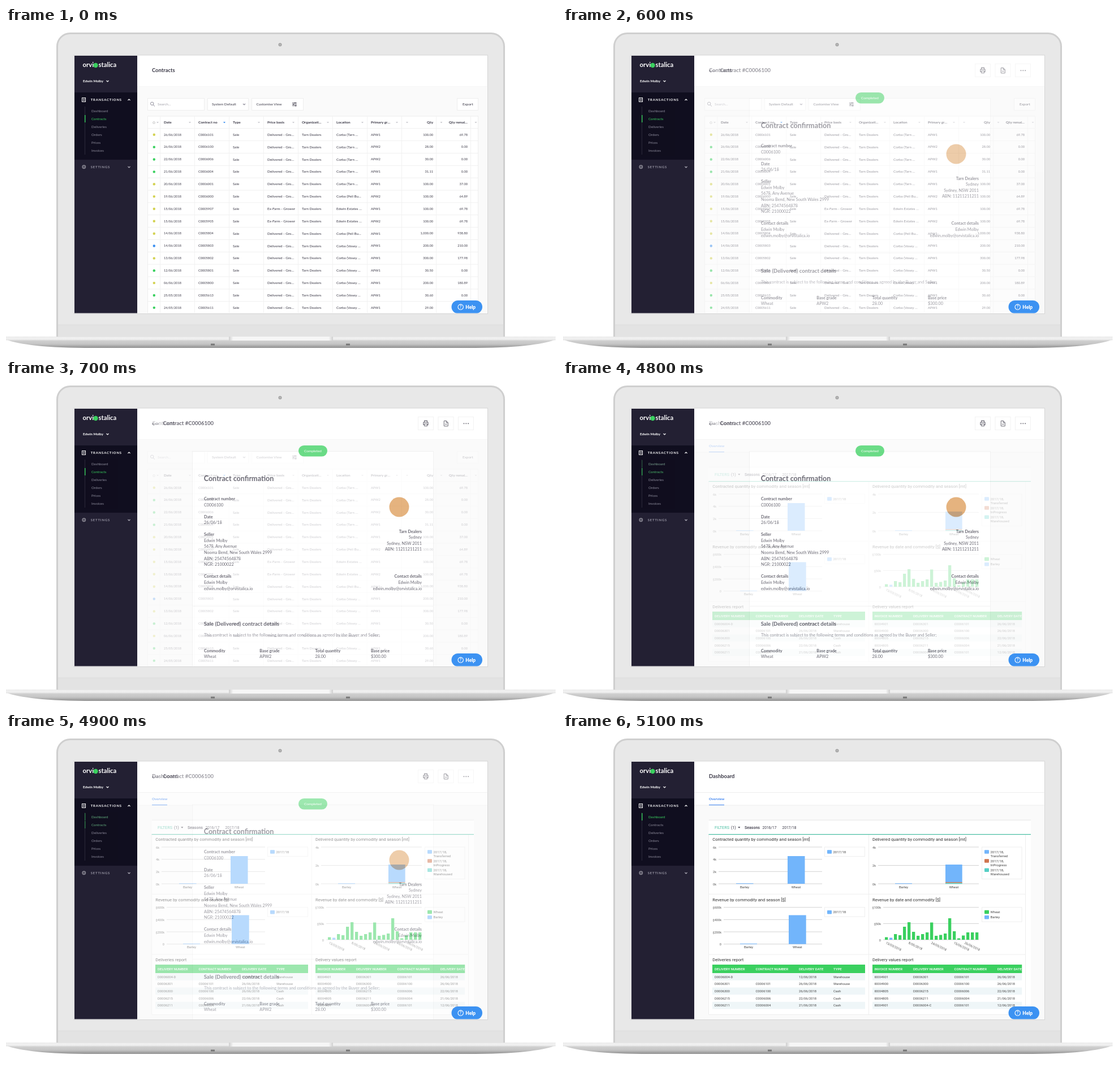
Write an HTML page that moves like this. It is 974x575 px and loops after 8000 ms.

```html
<!DOCTYPE html>
<html lang="en">
<head>
<meta charset="utf-8">
<title>Contracts</title>
<style>
html, body { margin: 0; width: 100%; height: 100%; overflow: hidden; background: #fff; }
svg { display: block; width: 100%; height: 100%; }
text { font-family: Lato, "Open Sans", sans-serif; white-space: pre; }
.din text { font-family: Roboto, Inter, sans-serif; }
</style>
</head>
<body>
<svg id="stage" viewBox="0 0 974 575">
  <defs>
    <clipPath id="screen"><rect x="121" y="49" width="729.5" height="455.5"/></clipPath>
    <clipPath id="report"><rect x="547" y="400" width="264.5" height="100"/></clipPath>
    <linearGradient id="deck" x2="0" y2="1">
      <stop offset="0" stop-color="#e4e4e4"/><stop offset=".35" stop-color="#f3f3f3"/><stop offset="1" stop-color="#e6e6e6"/>
    </linearGradient>
    <linearGradient id="under" x2="0" y2="1">
      <stop offset="0" stop-color="#d4d4d4"/><stop offset=".55" stop-color="#c4c4c4"/><stop offset="1" stop-color="#8f8f8f"/>
    </linearGradient>
    <linearGradient id="notch">
      <stop offset="0" stop-color="#cfcfcf"/><stop offset=".04" stop-color="#f6f6f6"/>
      <stop offset=".96" stop-color="#f6f6f6"/><stop offset="1" stop-color="#cfcfcf"/>
    </linearGradient>
  </defs>
</svg>
<script>
const INK = '#3b3947', GREEN = '#3ad05f', BLUE = '#72b5fb', LINE = '#eeeeee';
const attrs = o => Object.entries(o).map(([k, v]) => ` ${k}="${v}"`).join('');
const rect = (x, y, w, h, fill, o = {}) =>
  `<rect x="${x}" y="${y}" width="${w}" height="${h}" fill="${fill}"${attrs(o)}/>`;
const path = (d, stroke, width = 1, o = {}) =>
  `<path d="${d}" fill="none" stroke="${stroke}" stroke-width="${width}"${attrs(o)}/>`;
const shape = (d, fill) => `<path d="${d}" fill="${fill}"/>`;
const dot = (x, y, r, fill, o = {}) => `<circle cx="${x}" cy="${y}" r="${r}" fill="${fill}"${attrs(o)}/>`;
const hline = (x1, x2, y, c = LINE, w = 1) => path(`M${x1} ${y}H${x2}`, c, w);
const vline = (x, y1, y2, c = LINE, w = 1) => path(`M${x} ${y1}V${y2}`, c, w);
const box = (x, y, w, h, r = 0) => rect(x, y, w, h, '#fff', { stroke: LINE, rx: r });
const chevron = (x, y, c, up = 1) => path(`M${x - 2} ${y - up}l2 ${2 * up}l2 ${-2 * up}`, c, 1.1);
const caret = (x, y, c) => shape(`M${x - 2} ${y - 1}h4l-2 2.4z`, c);
// y is the middle of the capitals
const text = (x, y, s, size, fill = INK, o = {}) =>
  `<text x="${x}" y="${(y + size * .35).toFixed(2)}" font-size="${size}" fill="${fill}"${attrs(o)}>${s}</text>`;
const bold = (x, y, s, size, fill = INK, o = {}) => text(x, y, s, size, fill, { 'font-weight': 700, ...o });
const END = { 'text-anchor': 'end' }, MID = { 'text-anchor': 'middle' };

function laptop() {
  return rect(90.5, 9.5, 790, 560, '#e8e8e8', { rx: 23, stroke: '#cfcfcf', 'stroke-width': 3 }) +
    rect(92, 525, 787, 21, '#e3e3e3') + hline(92, 879, 525, '#dcdcdc') +
    rect(0, 546, 974, 29, '#fff') +
    dot(484.5, 29.5, 3, '#a3a3a3') + dot(484.5, 29.5, 1.2, '#c4c4c4') +
    rect(120, 48, 731.5, 457.5, '#fff', { stroke: '#d6d6d6' }) +
    shape('M0 551H971.5C955 558 915 565.5 830 566H140C58 565.5 16 558 0 551z', 'url(#under)') +
    rect(0, 546, 971.5, 6.5, 'url(#deck)') +
    rect(394, 546, 184, 7, 'url(#notch)') +
    rect(362, 558.5, 7, 3, '#777') + rect(601, 558.5, 7, 3, '#777');
}

function sidebar() {
  return rect(121, 49, 111, 456, '#232033') +
    bold(135.5, 65, 'orvi', 11.3, '#fff') + dot(158.5, 66, 4.2, GREEN) +
    bold(163.5, 65, 'stalica', 11.3, '#fff') +
    bold(136, 93.5, 'Edwin Molby', 6.2, '#fff') + chevron(179.5, 94, '#fff') +
    rect(121, 114, 111, 119, '#100e1f') +
    rect(134.5, 123.5, 6, 7, 'none', { stroke: '#fff' }) +
    path('M136 125.5h3.2M136 127h3.2M136 128.5h3.2', '#fff', .7) +
    bold(149.7, 127, 'TRANSACTIONS', 5.9, '#fff', { 'letter-spacing': .87 }) + chevron(217.5, 127, '#fff', -1) +
    dot(137.8, 245.8, 2.6, 'none', { stroke: '#85838f', 'stroke-width': 1.7 }) +
    dot(137.8, 245.8, .9, '#85838f') +
    bold(149.7, 245.8, 'SETTINGS', 5.9, '#9a98a6', { 'letter-spacing': .87 }) + chevron(217.5, 246, '#b5b3be');
}

function nav(active) {
  const names = ['Dashboard', 'Contracts', 'Deliveries', 'Orders', 'Prices', 'Invoices'];
  return rect(138, 138, 60, 88, '#100e1f') + vline(139.5, 139, 224, '#2b293a') +
    names.map((s, i) => text(151, 146.7 + i * 14, s, 6.2, i == active ? GREEN : '#8e8c9b')).join('') +
    vline(139.7, 140 + active * 14, 153 + active * 14, GREEN, 1.4);
}

const base = active => nav(active) + rect(232, 49, 619, 456, '#fafafa') + rect(232, 49, 619, 54, '#fff') +
  hline(232, 851, 103.5, '#f6f6f6');

function listPage() {
  const Y = '#d3d252', G = GREEN, B = '#3b8ff0';
  const places = ['Corba (Tarn …', 'Corba (Pell Bu…', 'Edwin Estates …', 'Corba (Vosey …'];
  // status, date, contract, grade, place, quantity, remaining
  const rows = `Y 26/06 6101 1 0 100.00 69.78
G 26/06 6100 2 0 28.00 0.00
G 22/06 6006 2 0 30.00 0.00
G 21/06 6004 1 0 31.11 0.00
Y 20/06 6001 1 0 100.00 37.00
Y 19/06 6000 2 1 100.00 64.89
Y 15/06 5907 1 2 100.00 69.78
Y 15/06 5905 2 2 100.00 69.78
Y 14/06 5804 1 1 1,000.00 938.80
B 14/06 5803 1 3 200.00 210.00
Y 13/06 5802 1 3 300.00 177.98
G 12/06 5801 1 3 30.50 0.00
Y 06/06 5800 1 3 200.00 180.89
G 25/05 5613 1 3 30.60 0.00
G 24/05 5611 1 3 29.00 0.00`.split('\n').map(r => r.split(' '));
  const heads = ['Date', 'Contract no', 'Type', 'Price basis', 'Organizati…', 'Location', 'Primary gr…'];
  let s = base(1) + bold(258, 75, 'Contracts', 9.4) +
    box(250.5, 124.5, 100, 21) + dot(258.2, 133.8, 2.7, 'none', { stroke: '#8d8b98' }) +
    path('M260.2 136l2.8 2.6', '#8d8b98') + text(268, 135, 'Search...', 6.4, '#a5a4ac') +
    box(356.5, 124.5, 72, 21) + text(364, 135, 'System Default', 6.4) + chevron(421, 135, '#8d8b98') +
    box(434.5, 124.5, 91, 21) + text(442.5, 135, 'Customise View', 6.4) +
    path('M506 132.5h8M506 135h8M506 137.5h8', INK, .8) +
    path('M511 131.4v2.2M508 133.9v2.2M512 136.4v2.2', INK, 1.5) +
    box(797.5, 124.5, 37, 21) + text(807, 135, 'Export', 6.4) +
    rect(250.5, 156, 584, 349, '#fff', { stroke: LINE });
  for (let i = 0; i < 10; i++) s += vline(272.5 + 61 * i, 156, 505, '#f2f2f2');
  s += dot(261.5, 167.5, 1.8, 'none', { stroke: '#aaa', 'stroke-width': .7 }) + caret(268, 167, '#c9c9cf');
  heads.forEach((h, i) => {
    s += bold(279 + 61 * i, 167, h, 6.4) +
      caret(325 + 61 * i, 167, i == 1 ? '#3b8ff0' : '#c9c9cf');
  });
  s += bold(755, 167, 'Qty', 6.4, INK, END) + bold(816, 167, 'Qty remai…', 6.4, INK, END) +
    [709, 769.5, 830.5].map(x => caret(x, 167, '#c9c9cf')).join('');
  rows.forEach(([c, date, no, grade, place, qty, left], i) => {
    const y = 188.6 + 21.86 * i;
    s += hline(251, 834, y - 10.9, '#f0f0f0') + dot(261.8, y + .2, 2.2, { Y, G, B }[c]) +
      text(279, y, date + '/2018', 5.6) + text(340, y, 'C000' + no, 5.65) + text(401, y, 'Sale', 6.3) +
      text(462, y, place == 2 ? 'Ex-Farm - Grower' : 'Delivered - Gro…', 6.3) +
      text(523, y, 'Tarn Dealers', 6.3) + text(584, y, places[place], 6.3) + text(645, y, 'APW' + grade, 5.8) +
      text(755, y, qty, 5.7, INK, END) + text(816, y, left, 5.7, INK, END);
  });
  return s;
}

function contractPage() {
  const lines = (x, y, list, o) => list.map((v, i) => (i ? text : bold)(x, y + 10.65 * i, v, 7.25, INK, o)).join('');
  let s = base(1) + path('M270 76H258.5m3.5 -3l-3.5 3l3.5 3', '#777581', .9) +
    bold(277.5, 75, 'Contract #C0006100', 9.5) +
    [728.5, 764, 799.5].map(x => box(x, 63.5, 27, 23)).join('') +
    path('M739.5 73v-2.6h5v2.6M739.5 77.5h-1.6v-4.3h8.2v4.3h-1.6', INK, 1.1) +
    rect(739.7, 76, 4.8, 3.6, 'none', { stroke: INK }) +
    path('M774.3 70.5h4l3 3v6.3h-7zM778.2 70.5v3.2h3', INK, 1) + path('M776 76.5h3.6', INK, .9) +
    [809.5, 813.3, 817.1].map(x => dot(x, 75.3, .95, INK)).join('') +
    rect(329.5, 124.5, 426, 390, '#fff', { stroke: LINE }) +
    rect(517, 114, 51, 19.5, GREEN, { rx: 9.75 }) + text(542.5, 124, 'Completed', 6.4, '#fff', MID) +
    bold(349.7, 173, 'Contract confirmation', 12.6) +
    lines(350, 208.5, ['Contract number', 'C0006100']) +
    lines(350, 240, ['Date', '26/06/18']) +
    lines(350, 271.5, ['Seller', 'Edwin Molby', '5678, Any Avenue', 'Nooma Bend, New South Wales 2999',
      'ABN: 25474564878', 'NGR: 21000022']) +
    dot(695, 223, 17.5, '#dc9a55') +
    lines(735, 266, ['Tarn Dealers', 'Sydney', 'Sydney, NSW 2011', 'ABN: 11211211211'], END) +
    hline(330, 755, 398.3);
  const contact = ['Contact details', 'Edwin Molby', 'edwin.molby@orvistalica.io'];
  s += lines(350, 345.7, contact) + lines(735, 345.7, contact, END) +
    bold(349.7, 430, 'Sale (Delivered) contract details', 9.5) +
    text(350, 449, 'This contract is subject to the following terms and conditions as agreed by the Buyer and Seller;', 7.45, '#777581');
  [['Commodity', 'Wheat'], ['Base grade', 'APW2'], ['Total quantity', '28.00'], ['Base price', '$300.00']]
    .forEach((v, i) => s += lines(350 + 98.3 * i, 477.3, v));
  return s;
}

function axes(x1, x2, top, bottom, labels) {
  const step = (bottom - top) / (labels.length - 1);
  return labels.map((v, i) => hline(x1, x2, top + step * i, '#cfcfcf', .9) +
    text(x1 - 4, top + step * i + .8, v, 5.6, '#555', END)).join('');
}

function legend(x, y, w, h, items) {
  return box(x, y, w, h) + items.map(([color, dy, ...names]) =>
    rect(x + 4.5, y + dy - 3.2, 8, 6.4, color, { rx: 1 }) +
    names.map((n, i) => text(x + 15, y + dy + 7.3 * i, n, 6, '#444')).join('')).join('');
}

function report(x, w, cols, rows) {
  return rect(x, 408, w, 15, GREEN) + rows.map((row, r) => {
    const y = r ? 429.6 + 12.65 * (r - 1) : 415.6;
    return (r % 2 ? rect(x, y - 6.4, w, 12.65, '#eff6f8') : '') + row.map((v, i) => r
      ? text(cols[i], y, v, 5.85, '#444')
      : text(cols[i], y, v, 6.1, '#fff', { 'font-weight': 500 })).join('');
  }).join('');
}

function dashboardPage() {
  const TEAL = '#4cc0a4', RUST = '#d0754f';
  const title = (x, y, s) => text(x, y, s, 7.6, '#333');
  const names = (a, b, y) => text(a, y, 'Barley', 5.9, '#444', MID) + text(b, y, 'Wheat', 5.9, '#444', MID);
  const bars = [4.5, 3.5, 10, 8, 23, 31, 14, 7, 10, 13, 30.5, 7, 8.5, 11, 38, 15, 2.5, 7.5, 13, 13, 13];
  const dates = [[571, '13/03/2018'], [611, '8/05/2018'], [651, '24/05/2018'], [691, '15/06/2018'], [710, '26/06/2018']];
  const d = (n, date) => `${n} ${date}/06/2018`;
  const table = (head, body) => [head, ...body.split('\n').map(r => r.split(' ').map(v => v == '_' ? '' : v))];

  return base(0) + rect(232, 103, 619, 23, '#fff') + hline(232, 851, 103.5) + hline(232, 851, 126) +
    bold(258, 75, 'Dashboard', 9.4) + bold(258, 114.3, 'Overview', 6.3, '#3b82f0') +
    hline(258, 285, 125.5, '#3b82f0', 1.2) +
    rect(257.5, 152, 569.5, 344.5, '#fff') + hline(257.5, 827, 152.3, '#e6e6e6') +
    `<g class="din">` +
    text(268, 165.3, 'FILTERS', 7.2, TEAL) + text(297, 165.3, '(1)', 7) + caret(311.3, 165.3, INK) +
    text(321, 165.3, 'Seasons', 7, INK, { 'font-weight': 500 }) +
    text(352.5, 165.3, '2016/17', 6.6) + text(387.5, 165.3, '2017/18', 6.6) +
    vline(257.5, 178, 496) + vline(540.5, 178, 496) + vline(817.5, 178, 496) +
    [283.3, 390, 496.5].map(y => hline(257.5, 817.5, y)).join('') +
    hline(257.5, 827, 177.6, TEAL, 1.3) +

    title(264.3, 186.5, 'Contracted quantity by commodity and season [mt]') +
    axes(275, 458, 200, 265, ['6k', '4k', '2k', '0k']) +
    rect(306, 264.2, 30.5, 1, BLUE) + rect(397, 216, 30.5, 49, BLUE) + names(321, 412, 270.5) +
    legend(462.5, 200, 71, 16.5, [[BLUE, 8.5, '2017/18']]) +

    title(547, 186.5, 'Delivered quantity by commodity and season [mt]') +
    axes(557, 735, 200, 265, ['4k', '2k', '0k']) +
    rect(587, 264.2, 30, 1, BLUE) + rect(676, 231, 29.7, 31, BLUE) + rect(676, 262, 29.7, 1.6, RUST) +
    rect(676, 263.6, 29.7, 1.6, '#56cfc5') + names(602, 691, 270.5) +
    legend(740.5, 200, 70.5, 56.5, [[BLUE, 8.5, '2017/18,', 'Transferred'],
      [RUST, 24.5, '2017/18,', 'InProgress'], ['#56cfc5', 40.7, '2017/18,', 'Warehoused']]) +

    title(264.3, 293.3, 'Revenue by commodity and season [$]') +
    axes(284, 458, 306.7, 371.7, ['$600k', '$400k', '$200k', '0']) +
    rect(313, 370.8, 30, 1, BLUE) + rect(399, 320.5, 30.7, 51.2, BLUE) + names(328, 414.3, 377.3) +
    legend(462.5, 306.7, 71, 16.5, [[BLUE, 8.5, '2017/18']]) +

    title(547, 293.3, 'Revenue by date and commodity [$]') +
    axes(566, 735, 306.7, 364, ['$100k', '$50k', '0']) +
    bars.map((h, i) => rect(569 + 8 * i, 364 - h, 5.3, h, i == 1 ? BLUE : GREEN)).join('') +
    dates.map(([x, v]) => text(x, 369, v, 5.6, '#555', { transform: `rotate(26 ${x} 369)` })).join('') +
    legend(740.5, 306.7, 70.5, 25.5, [[GREEN, 8.3, 'Wheat'], [BLUE, 17.5, 'Barley']]) +

    title(264.3, 399.7, 'Deliveries report') + title(547, 399.7, 'Delivery values report') +
    report(264, 270, [268, 340.5, 417, 478], table(
      ['DELIVERY NUMBER', 'CONTRACT NUMBER', 'DELIVERY DATE', 'TYPE'],
      [d('D0006004-D _', 12) + ' Warehouse', d('D0006301 C0006101', 26) + ' Warehouse',
        d('D0006300 C0006100', 26) + ' Cash', d('D0006215 C0006006', 22) + ' Cash',
        d('D0006211 C0006004', 21) + ' Cash'].join('\n'))) +
    `<g clip-path="url(#report)">` +
    report(547, 264.5, [550.5, 619, 691.5, 767.7], table(
      ['INVOICE NUMBER', 'DELIVERY NUMBER', 'CONTRACT NUMBER', 'DELIVERY DATE'],
      [d('I0004901 D0006301 C0006101', 26), d('I0004900 D0006300 C0006100', 26),
        d('I0004805 D0006215 C0006006', 22), d('I0004805 D0006211 C0006004', 21),
        d('I0004901 D0006004-C C0006101', 12)].join('\n'))) +
    '</g></g>';
}

const help = rect(787.5, 482, 54.5, 23, '#3c92f2', { rx: 11.5 }) +
  dot(803.7, 493.6, 4.7, 'none', { stroke: '#fff', 'stroke-width': 1.1 }) +
  bold(803.7, 493.7, '?', 7, '#fff', MID) +
  text(812.3, 493.7, 'Help', 8.4, '#fff', { 'font-weight': 900 });

const stage = document.getElementById('stage');
stage.insertAdjacentHTML('beforeend', laptop() + '<g clip-path="url(#screen)">' + sidebar() +
  `<g>${listPage()}</g><g id="contract">${contractPage()}</g><g id="dashboard">${dashboardPage()}</g>` +
  help + '</g>');

const contract = document.getElementById('contract');
const dashboard = document.getElementById('dashboard');
// four even steps of 100 ms, the first one at the start time
const fade = (t, start) => Math.min(1, Math.max(0, (Math.floor((t - start) / 100) + 1) / 4));

const begin = performance.now();
function draw() {
  const t = (performance.now() - begin) % 8000;
  contract.setAttribute('opacity', fade(t, 500));
  dashboard.setAttribute('opacity', fade(t, 4800));
  requestAnimationFrame(draw);
}
draw();
</script>
</body>
</html>
```
